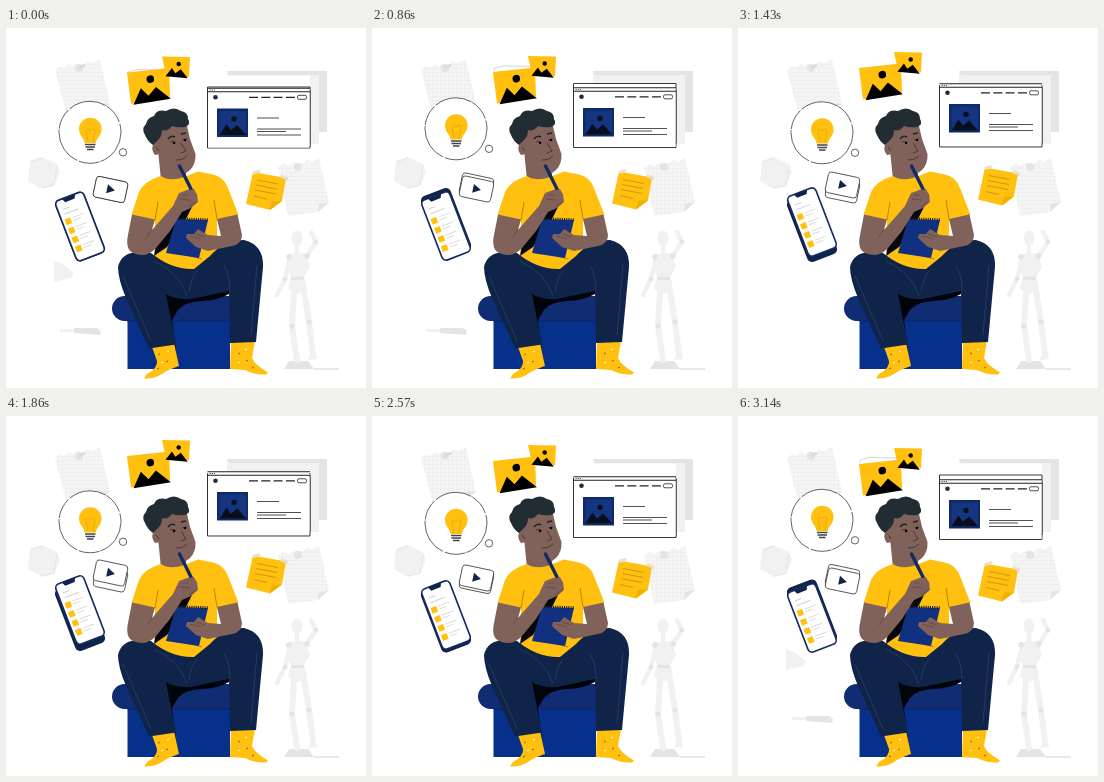
Recreate the animation shown at these times as an HTML page. Size 360x360 px, loop 3.21 s.

```html
<!DOCTYPE html>
<html lang="en">
<head>
<meta charset="utf-8">
<title>Thinking about ideas</title>
<style>
html, body { margin: 0; width: 100%; height: 100%; overflow: hidden; background: #fff; }
svg { display: block; width: 100vw; height: 100vh; }
.line { fill: none; stroke: #222; stroke-width: .8; }
.card { fill: #fff; stroke: #222; stroke-width: .9; }
.pale { fill: #f1f1f1; }
.grey { fill: #e4e4e4; }
.sun { fill: #ffc010; }
.blue { fill: #06308a; }
.navy { fill: #10244a; }
.skin { fill: #80625a; }
.hair { fill: #222d33; }
.limb { fill: none; stroke: #f1f1f1; stroke-width: 6; stroke-linejoin: round; stroke-linecap: round; }
</style>
</head>
<body>
<svg viewBox="0 0 360 360">
  <defs>
    <pattern id="grid" width="4" height="4" patternUnits="userSpaceOnUse">
      <rect width="4" height="4" fill="#f5f5f5"/>
      <path d="M0 0H4M0 0V4" stroke="#e8e8e8" stroke-width=".7"/>
    </pattern>
    <g id="hills">
      <path d="M-17 13-8-1-2 7 6 0 18 13Z"/>
      <circle cx="2" cy="-8" r="3.5"/>
    </g>
  </defs>

  <!-- pale papers -->
  <path d="M49 42 54 38 58 40 63 36 67 38 72 35 77 37 81 33 86 35 94 31 104 76 90 84 61 88Z" fill="url(#grid)"/>
  <path d="M90 84 94 75 104 76Z" class="grey"/>
  <circle cx="73" cy="40" r="4" class="grey"/><path d="M73 40 79 37" stroke="#dadada" stroke-width="3"/>
  <path d="M272 139 278 136 283 138 289 134 295 136 301 132 306 134 313 130 323 174 312 184 282 188Z" fill="url(#grid)"/>
  <path d="M312 184 313 176 323 174Z" class="grey"/>
  <circle cx="292" cy="139" r="4" class="grey"/>
  <path d="M24 133 35 129 51 136 54 144 48 158 36 161 22 153Z" class="pale"/>
  <path d="M25 134 36 130M51 138 48 157 36 160" fill="none" stroke="#e6e6e6"/>
  <path id="scrap" d="M48 233 56 236 68 245 65 250 48 254Z" class="pale"/>
  <g id="stylus">
    <path d="M54 301 68 301 68 304 54 304Z" class="pale"/>
    <path d="M68 300 91 300 95 303 94 307 68 305Z" class="grey"/>
  </g>

  <!-- browser: the lower pane slips out from under the upper one -->
  <path d="M221 43H321V104H313V116H304V60H221Z" class="pale"/>
  <path d="M221 43H321V104H313V47H223Z" class="grey"/>
  <path id="gap" d="M221 47.500H304V62H221Z" fill="#fff"/>
  <path class="front card" d="M201.500 62H304V120H201.500Z"/>
  <g class="back"><path d="M201.500 59H304V118.500H201.500Z" class="card"/></g>
  <g class="front">
    <path d="M202 60H303.500V119.500H202Z" fill="#fff"/>
    <path d="M201.500 60.300H304M201.500 63.700H304" class="line" style="stroke-width:1.1"/>
    <path d="M203.500 62H209" class="line" stroke-dasharray="1.200 1"/>
    <circle cx="209.500" cy="69.300" r="2.300" class="hair"/>
    <path d="M243 69.300H289" class="line" style="stroke-width:1.2" stroke-dasharray="9 3.300"/>
    <rect x="291.500" y="67.300" width="9" height="4" rx="1.500" class="line"/>
    <path d="M211 80.500H242V109H211Z" fill="#0e2a68"/>
    <path d="M213.500 83H240V107H213.500Z" fill="#14357f"/>
    <use href="#hills" transform="translate(226.500 97) scale(.76)" fill="#080e1c"/>
    <path d="M251 90H273M251 101H295M251 103.500H280M251 107H295" class="line"/>
  </g>

  <!-- pictures -->
  <path class="back line" d="M122 47V44L131 41.500 162 42" style="stroke:#ccc"/>
  <g class="front">
    <path d="M121 44.500 163 40 164 69 125 76Z" class="sun"/>
    <use href="#hills" transform="translate(143.500 60) rotate(-9) scale(1.080)"/>
    <path d="M156 28.500 184 29 183 49 160 46.500Z" class="sun"/>
    <use href="#hills" transform="translate(171 41) rotate(5) scale(.64)"/>
  </g>

  <!-- bulb -->
  <g class="back">
    <circle cx="84" cy="104.300" r="31" class="card" style="stroke-width:.7" stroke-dasharray="38 1 21 2"/>
    <circle cx="117" cy="124.300" r="3.700" class="card" style="stroke-width:.7"/>
    <path d="M78.500 115C78.500 110 73 108 73 101A11.300 11.300 0 0 1 95.600 101C95.600 108 90 110 90 115Z" class="sun"/>
    <path d="M82 114 80 102Q82 99 84 103 86 99 89 102L87 114" fill="none" stroke="#e9a20a" stroke-width=".8"/>
    <path d="M79 116.500H89.500M79.500 119H89M81 121.500H87.500" stroke="#3e464a" stroke-width="1.700"/>
  </g>

  <!-- video card -->
  <rect class="back card" x="-16" y="-10.500" width="32" height="21" rx="3" data-pose="translate(104.500 161.500) rotate(12)" style="stroke-width:.7"/>
  <g class="front">
    <g transform="translate(104.500 161.500) rotate(12)">
      <rect x="-16" y="-10.500" width="32" height="21" rx="3" class="card" style="stroke-width:.7"/>
      <path d="M-3.500-4.500 4.500 0-3.500 4.500Z" class="navy"/>
    </g>
  </g>

  <!-- phone -->
  <rect class="back navy" x="-15.800" y="-33" width="31.600" height="66" rx="5" data-pose="translate(74 198.500) rotate(-21)"/>
  <g class="front">
    <g transform="translate(74 198.500) rotate(-21)">
      <rect x="-15" y="-32.200" width="30" height="64.400" rx="4.500" fill="#fff" stroke="#142c63" stroke-width="1.700"/>
      <path d="M-7-32H7L5-28H-5Z" class="navy"/>
      <path d="M-10-22H-3M-10-17H5" stroke="#d2d2d2"/>
      <g id="rows"></g>
    </g>
  </g>

  <!-- sticky note -->
  <g class="front">
    <path d="M247 144 280 150 276 173 264 182 240 176Z" class="sun"/>
    <path d="M264 182 266 173 276 173Z" fill="#efb000"/>
    <path d="M251 152 272 156M250 157 271 161M249 162 270 166M248 168 261 171" stroke="#c08e0c" stroke-width=".8"/>
    <path d="M247 145 254 143M275 148 282 151" stroke="#e8e0c8" stroke-width="3"/>
  </g>

  <!-- wooden figure -->
  <path d="M278 341 283 333H302L308 341Z" class="grey"/>
  <path d="M308 341H333" stroke="#c4c4c4" stroke-width=".8"/>
  <path d="M291 216V228M284 230 279 251 271 267M300 229 310 214 305 204" class="limb" style="stroke-width:4.500"/>
  <path d="M288 263 286 298 291 332M298 263 303 294 307 326" class="limb"/>
  <path d="M283 226 300 225 304 239 298 249H285L281 239ZM284 251H299L301 261 292 266 282 261Z" class="pale"/>
  <ellipse cx="291" cy="210" rx="5.500" ry="7.500" class="pale"/>
  <path d="M304 327 310 326 311 331 302 332Z" class="pale"/>
  <g class="grey">
    <circle cx="283" cy="229" r="2.800"/><circle cx="301" cy="228" r="2.800"/>
    <circle cx="279" cy="251" r="2.300"/><circle cx="310" cy="214" r="2.300"/>
    <circle cx="286" cy="298" r="2.600"/><circle cx="303" cy="294" r="2.600"/>
    <path d="M285 249H298V252H285Z"/>
  </g>

  <!-- seat -->
  <path d="M121.500 280H224V341H121.500Z" class="blue"/>
  <path d="M118.500 268H226V293H118.500A12.500 12.500 0 0 1 118.500 268Z" fill="#102d74"/>
  <path d="M121 293H224" stroke="#08225f" stroke-width=".7"/>
  <path d="M158 262 225 260 223 266Q211 273 195 273 178 274 172 282L166 292 172 341 163 318Z" fill="#02040b"/>

  <!-- feet -->
  <path d="M146 319 168 315 173 338Q163 341 156 346 148 351 138 350.500L141 346Q152 340 151 333Z" class="sun"/>
  <path d="M225 314 249 313 246 330Q249 337 262 344.500L260 346.500Q249 347 239 342L224 341Z" class="sun"/>
  <path d="M152 327 154 326M160 334 162 333M151 341 153 340M232 325 234 326M240 333 242 332M246 340 248 339" stroke="#5e4813" stroke-width=".8"/>
  <path d="M161 324 163 323M155 335 157 334M239 322 241 321M232 335 234 334" stroke="#fff"/>

  <!-- neck, torso -->
  <path d="M152 122 155 152 178 154 182 138Z" class="skin"/>
  <path d="M155 148Q164 154 178 149L192 143.500 207 146.500Q218 149 222 160L232.500 187 211 192V241H148L149 192 125.500 187 133 164Q138 153 155 148Z" class="sun"/>
  <path d="M149 192 152 174M211 191 208 172M177 226 196 231" class="line" style="stroke:#997000;stroke-width:.7"/>
  <path d="M189 173 180 191 161 219 148 228 151 211 177 179Z" fill="#05070c"/>

  <!-- head -->
  <path d="M151 104 172 95 181 98 184 111 189.500 126Q190 136 184 142 176 149 165 145 157 140 154 126L149 127Q144 121 148 115Z" class="skin"/>
  <path d="M147 117Q142 114 139 107 135 101 140 96 141 90 148 88 151 81 160 83 168 78 175 83 182 84 182 91 185.500 96 179 99 172 100 166 98 161 104 156 102 156 108 153 111 153 117Z" class="hair"/>
  <path d="M162 111Q165 107 169 109M175 106 180 105" fill="none" stroke="#1d2428" stroke-width="1.500"/>
  <path d="M164 114Q167 112 170 115M176 112 181 111M175 115 180 123 175 125M170 132Q176 133 181 128M150 119 153 123" fill="none" stroke="#3d2b27" stroke-width=".8"/>
  <circle cx="168" cy="115" r="1.200"/><circle cx="179" cy="112" r="1.200"/>

  <!-- legs -->
  <path d="M145 225Q116 220 112 239 112 251 120 270L143 320.500 170 316.500 160 266Q169 272 185 271L223 263 224 315 250 314 257 239Q258 217 238 212 218 212 204 228L188 241Q166 242 145 225Z" class="navy"/>
  <path d="M148 233Q174 245 181 268M224 263Q224 247 218 238M191 243Q185 250 183 264M117 248 145 313M251 237 245 307" fill="none" stroke="#33496f" stroke-width=".6"/>

  <!-- notebook, arms, pen -->
  <path d="M170 191 202 192 193 230 160 225Z" fill="#11307f"/>
  <path d="M170 190.500 202 191.500" stroke="#171c29" stroke-width="2.500" stroke-dasharray="1 1.200"/>
  <path d="M211 191 231.500 186.500 236 207Q236 216 226 218L202 223 190 219 180 210 181 206 188 206 192 201 202 207 215 208Z" class="skin"/>
  <path d="M184 208 195 211M190 206 199 209" stroke="#5d443d" stroke-width=".7"/>
  <path d="M126 186.500 149 191.500 146 202 167 178 173 165 184 161 191 166 192 174 185 180 176 184 164 203 150 220Q140 231 127 225 119 221 122 207Z" class="skin"/>
  <path d="M146 201 141 209M174 171 184 172M176 167 186 167M183 179 190 174" stroke="#5d443d" stroke-width=".7"/>
  <path d="M173.500 138 186 163" stroke="#142a60" stroke-width="3.400" stroke-linecap="round"/>
  <path d="M180 163 188 161 191 167 183 170Z" class="skin"/>
</svg>
<script>
const LOOP = 3210, STEP = LOOP / 45;
const KEYS = [0, 290, 860, 1430, 1860, 2140, 2570, 3140];
const FRONT = [0, 2, -.5, -4.5, -4.5, -2, .5, 3.5];
const BACK = [0, -1.5, -3.5, .5, 1.5, 2.5, 3, 0];

const $ = id => document.getElementById(id);
const all = name => [...document.querySelectorAll(name)];
const fronts = all('.front'), backs = all('.back');

$('rows').innerHTML = [0, 1, 2, 3].map(i => -9 + i * 9.7).map(y =>
  `<rect x="-12" y="${y - 3}" width="6" height="6" class="sun"/>
   <path d="M-4 ${y - 2}H8M-4 ${y + 1}H4" stroke="#d8d8d8" stroke-width=".9"/>`).join('');

function at(values, t) {
  const i = KEYS.findIndex(k => k > t);
  if (i < 0) return values[values.length - 1];
  const u = (t - KEYS[i - 1]) / (KEYS[i] - KEYS[i - 1]);
  return values[i - 1] + (values[i] - values[i - 1]) * u;
}

function shift(parts, y) {
  for (const p of parts)
    p.setAttribute('transform', `translate(0 ${y}) ${p.dataset.pose || ''}`);
}

const show = (id, on) => $(id).setAttribute('visibility', on ? 'visible' : 'hidden');

function draw(now) {
  const t = Math.floor((now % LOOP) / STEP) * STEP;
  shift(fronts, at(FRONT, t));
  shift(backs, at(BACK, t));
  show('scrap', t < 600 || t > 2900);
  show('stylus', t < 1180 || t > 2650);
  show('gap', t < 600 || t > 2000);
  requestAnimationFrame(draw);
}
draw(0);
</script>
</body>
</html>
```
